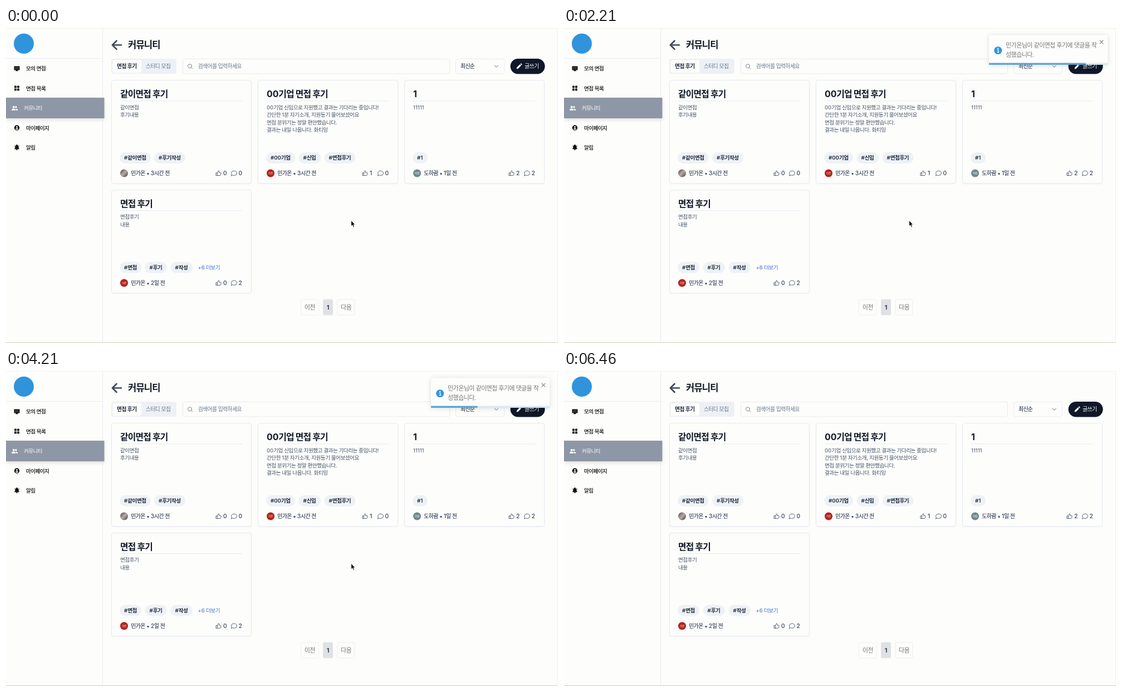
Recreate the animation shown at these times as an HTML page. Size 991 px wide and 565 px high, loop 6500 ms.

```html
<!DOCTYPE html>
<html lang="ko">
<head>
<meta charset="utf-8">
<title>커뮤니티</title>
<style>
html, body { margin: 0; width: 991px; height: 565px; overflow: hidden; background: #fdfdfb; }
svg { display: block; overflow: hidden; }
text {
  font-family: Inter, "Noto Sans CJK KR", "Noto Sans CJK", sans-serif;
  letter-spacing: -.05em; white-space: pre; fill: #475569;
}
tspan { letter-spacing: 0; }
.title { font-weight: 700; fill: #111827; }
.bold { font-weight: 600; fill: #1e293b; }
.nav { fill: #111; stroke: #111; stroke-width: .22px; }
.meta { fill: #334155; stroke: #334155; stroke-width: .18px; }
.mute { fill: #64748b; }
.gray { fill: #757575; }
.link { fill: #3b73d9; }
.white { fill: #fff; }
.line { fill: none; stroke: #e8ebf2; }
.icon { fill: none; stroke: #475569; stroke-linecap: round; stroke-linejoin: round; }

.toast { animation: slide 6500ms infinite; }
.bar { transform-box: fill-box; transform-origin: left; animation: drain 6500ms linear infinite; }
.pointer { animation: hide 6500ms step-end infinite; }
.card-shadow { filter: drop-shadow(0 1px 1px rgba(40, 50, 90, .04)); }
.toast-shadow { filter: drop-shadow(0 1px 4px rgba(0, 0, 0, .13)); }
.nav-shadow { filter: drop-shadow(0 3px 3px rgba(0, 0, 0, .11)); }

/* bounce in, rest, bounce out; the loop cuts the exit short */
@keyframes slide {
  0% { opacity: 0; transform: translateX(3000px); }
  10.46% { opacity: 0; transform: translateX(3000px); animation-timing-function: cubic-bezier(.215, .61, .355, 1); }
  16.55% { opacity: 1; transform: translateX(-25px); animation-timing-function: cubic-bezier(.215, .61, .355, 1); }
  18.07% { transform: translateX(10px); animation-timing-function: cubic-bezier(.215, .61, .355, 1); }
  19.6% { transform: translateX(-5px); animation-timing-function: cubic-bezier(.215, .61, .355, 1); }
  20.4% { transform: none; }
  93.18% { transform: none; animation-timing-function: ease; }
  95.2% { opacity: 1; transform: translateX(-20px); animation-timing-function: cubic-bezier(.327, .088, .402, .716); }
  100% { opacity: .12; transform: translateX(1753px); }
}
@keyframes drain {
  0%, 20.6% { transform: scaleX(1); }
  93.18%, 100% { transform: scaleX(0); }
}
@keyframes hide {
  0% { visibility: visible; }
  96%, 100% { visibility: hidden; }
}
</style>
</head>
<body>
<svg id="stage" width="991" height="565" viewBox="0 0 991 565">
  <defs>
    <linearGradient id="photo" x2="1" y2="1">
      <stop offset="0" stop-color="#4a4547"/>
      <stop offset=".5" stop-color="#b9a9a9"/>
      <stop offset="1" stop-color="#3b3638"/>
    </linearGradient>
  </defs>
</svg>
<script>
// Hangul is set tighter than digits and signs
const mixed = str => String(str).replace(/[^가-힣\s]+/g, '<tspan>$&</tspan>');
// y is the middle of the line of text
const text = (x, y, size, str, cls = '', extra = '') =>
  `<text x="${x}" y="${y + size * .37}" font-size="${size}" class="${cls}" ${extra}>${mixed(str)}</text>`;
const box = (x, y, w, h, r, attrs) =>
  `<rect x="${x}" y="${y}" width="${w}" height="${h}" rx="${r}" ${attrs}/>`;
const path = (d, attrs) => `<path d="${d}" ${attrs}/>`;
const at = (x, y, body) => `<g transform="translate(${x} ${y})">${body}</g>`;

const icons = {
  screen: path('M-5-4h10v7h-3.5l1 1.8h-5l1-1.8H-5z', 'fill="#111"') +
    path('M-3.5-2.5h7v4h-7z', 'fill="#333"'),
  grid: [[-4.5, -4.5], [.5, -4.5], [-4.5, .5], [.5, .5]]
    .map(([x, y]) => box(x, y, 4, 4, 1, 'fill="#111"')).join(''),
  people: `<g fill="#fff"><circle cx="-1.8" cy="-2" r="2"/><circle cx="2.4" cy="-2" r="1.7"/>` +
    path('M-5.5 4V2.6Q-5 .8-1.8.8T1.9 2.6V4zM2.7 4V2.4L2.1 1Q5.3.9 5.6 2.6V4z', '') + '</g>',
  user: '<circle r="4.7" fill="#111"/><circle cy="-1.4" r="1.5" fill="#fff"/>' +
    path('M-2.8 2.3Q0-.6 2.8 2.3 0 4.6-2.8 2.3z', 'fill="#fff"'),
  bell: path('M-4.2 3q1.2-1 1.2-3.4Q-3-3.4-.7-3.8v-.9H.7v.9Q3-3.4 3-.4 3 2 4.2 3zM-1.3 3.6h2.6Q1 5 0 5t-1.3-1.4zM-4.5-1.5l1-2.4M4.5-1.5l-1-2.4',
    'fill="#111" stroke="#111" stroke-width=".5"'),
  thumb: path('M-4.4-.4h2v4.7h-2zM-2.4-.2L-.3-4.3Q1.4-4.2 1.1-2.4L.7-1h2.7q1.2.2 1 1.3l-.7 3q-.3 1-1.2 1h-4.9',
    'class="icon" stroke-width=".9"'),
  bubble: path('M-4.5 4.4l.7-2.4Q-5-.2-3.9-2.3-2.4-4.2.6-4.2 5.3-3.9 5.4.1 5.1 3.9.8 4-.8 4-2 3.5z',
    'class="icon" stroke-width=".9"'),
};

const avatars = {
  photo: ['url(#photo)', ''],
  red: ['#b3231b', '가온'],
  teal: ['#6d898c', '하람'],
};

function nav(y, icon, label) {
  return at(19.5, y, icons[icon]) + text(36, y, 9.5, label, 'nav');
}

function card({ x, y, title, lines, tags, more, avatar, meta, likes, replies }) {
  const [tone, initials] = avatars[avatar];
  let tagX = 15, pills = '';
  for (const [label, w] of tags) {
    pills += box(tagX, 129.5, w, 20, 10, 'fill="#eef2f6"') + text(tagX + 8, 139.5, 9.6, label, 'bold');
    tagX += w + 6.5;
  }
  if (more) pills += text(tagX + 3, 139.5, 9.6, more, 'link');
  return at(x, y,
    box(.5, .5, 251, 185, 4, 'fill="#fdfdfb" stroke="#e5e8f1" class="card-shadow"') +
    text(16, 24.8, 15.8, title, 'title') +
    path('M16 37.5H235', 'class="line"') +
    lines.map((s, i) => text(16, 48.8 + i * 13.6, 9.6, s)).join('') +
    pills +
    `<circle cx="23" cy="167.2" r="7" fill="${tone}"/>` +
    text(23, 167.2, 4.8, initials, 'white', 'text-anchor="middle"') +
    text(35.3, 167, 9.8, meta, 'meta') +
    at(192.7, 167, icons.thumb) + text(201, 167, 10.3, likes, 'meta') +
    at(220, 167.2, icons.bubble) + text(228.6, 167, 10.3, replies, 'meta'));
}

const sidebar =
  '<circle cx="32" cy="28" r="18" fill="#2f94dc"/>' +
  path('M0 54.5H173M173.5 0V565', 'class="line"') +
  nav(72.5, 'screen', '모의 면접') + nav(108, 'grid', '면접 목록') +
  box(0, 125, 176.5, 37, 0, 'fill="#8e97a5" class="nav-shadow"') +
  at(15.5, 143.8, icons.people) + text(32, 143.5, 9.5, '커뮤니티', 'white') +
  nav(179, 'user', '마이페이지') + nav(214, 'bell', '알림');

const header =
  path('M207 30.5H191.5M198.5 23L191 30.5 198.5 38', 'class="icon" style="stroke:#414858" stroke-width="2.7"') +
  text(219, 30, 16.6, '커뮤니티', 'title') +
  box(189, 55, 117, 27, 4, 'fill="#edf1f6"') +
  box(191.5, 57.5, 51.5, 22.5, 2.5, 'fill="#fdfdfb"') +
  text(199, 68.7, 9.7, '면접 후기', 'bold') +
  text(251, 68.7, 9.7, '스터디 모집', 'mute') +
  box(317.5, 55.5, 479, 26.5, 4, 'class="line"') +
  '<circle cx="330" cy="68.3" r="3.5" class="icon" stroke-width=".9" stroke-opacity=".75"/>' +
  path('M332.6 71L335 73.4', 'class="icon" stroke-width=".9" stroke-opacity=".75"') +
  text(344.7, 68.7, 9.7, '검색어를 입력하세요', 'mute') +
  box(807.5, 55.5, 87, 26.5, 4, 'class="line"') +
  text(816, 68.7, 9.7, '최신순', 'meta') +
  path('M877.3 67.3L880.3 70.3 883.3 67.3', 'class="icon" stroke-width=".9"') +
  box(905.5, 55, 62, 27.5, 13.7, 'fill="#0f172a"') +
  path('M916.5 73.5l.6-2.8 5.4-5.4 2.2 2.2-5.4 5.4zM923.2 64.6l.9-.9q.6-.5 1.2 0l1 1q.5.6 0 1.2l-.9.9z', 'fill="#fff"') +
  text(931, 68.7, 9.8, '글쓰기', 'white');

const cards = [
  { x: 189, y: 93.3, title: '같이면접 후기', lines: ['같이면접', '후기내용'],
    tags: [['#같이면접', 55.5], ['#후기작성', 56]],
    avatar: 'photo', meta: '민가온 • 3시간 전', likes: 0, replies: 0 },
  { x: 452, y: 93.3, title: '00기업 면접 후기',
    lines: ['00기업 신입으로 지원했고 결과는 기다리는 중입니다!', '간단한 1분 자기소개, 지원동기 물어보셨어요',
      '면접 분위기는 정말 편안했습니다.', '결과는 내일 나옵니다. 화티잉'],
    tags: [['#00기업', 52], ['#신입', 39.5], ['#면접후기', 56]],
    avatar: 'red', meta: '민가온 • 3시간 전', likes: 1, replies: 0 },
  { x: 715, y: 93.3, title: '1', lines: ['11111'], tags: [['#1', 27]],
    avatar: 'teal', meta: '도하람 • 1일 전', likes: 2, replies: 2 },
  { x: 189, y: 290, title: '면접 후기', lines: ['면접후기', '내용'],
    tags: [['#면접', 39], ['#후기', 39.5], ['#작성', 39.5]], more: '+6 더보기',
    avatar: 'red', meta: '민가온 • 2일 전', likes: 0, replies: 2 },
].map(card).join('');

const pager =
  box(529.5, 487, 31.5, 28, 3, 'class="line" stroke-opacity=".7"') +
  text(535.7, 501, 11, '이전', 'gray') +
  box(569, 486.5, 18, 28.5, 3, 'fill="#dfe1e4"') +
  text(578, 501, 10.8, '1', 'bold', 'text-anchor="middle"') +
  box(595, 487, 31, 28, 3, 'class="line" stroke-opacity=".9"') +
  text(601, 501, 11, '다음', 'gray');

const pointer = path('M619.7 345.3v10.2l2.3-2.1 1.7 3.8 1.7-.8-1.7-3.6h3z',
  'class="pointer" fill="#000" stroke="#fff" stroke-width=".7"');

const toast = '<g class="toast">' +
  box(763, 12.5, 213, 53.5, 3, 'fill="#fdfdfb" class="toast-shadow"') +
  '<circle cx="779.2" cy="40.2" r="7" fill="#3498db"/>' +
  '<circle cx="779.2" cy="36.9" r="1.1" fill="#fff"/>' +
  path('M778 39.3h1.6v4.2M777.8 43.6h3', 'fill="none" stroke="#fff" stroke-width="1.3"') +
  text(793, 31, 11, '민가온님이 같이면접 후기에 댓글을 작', 'gray') +
  text(793, 47.6, 11, '성했습니다.', 'gray') +
  path('M961.7 22l6.6 6.6M968.3 22l-6.6 6.6', 'stroke="#8a8a8a" stroke-width="1.1"') +
  box(763, 62.7, 213, 3.3, 0, 'fill="#3498db" fill-opacity=".2"') +
  box(763, 62.7, 213, 3.3, 0, 'fill="#5ba5d9" class="bar"') + '</g>';

const edges = path('M0 564.5H991', 'stroke="#cccdb9"') +
  path('M0 .5H991M990.5 0V565', 'stroke="#f1f1e6"');

document.getElementById('stage').insertAdjacentHTML('beforeend',
  sidebar + header + cards + pager + edges + pointer + toast);
</script>
</body>
</html>
```
